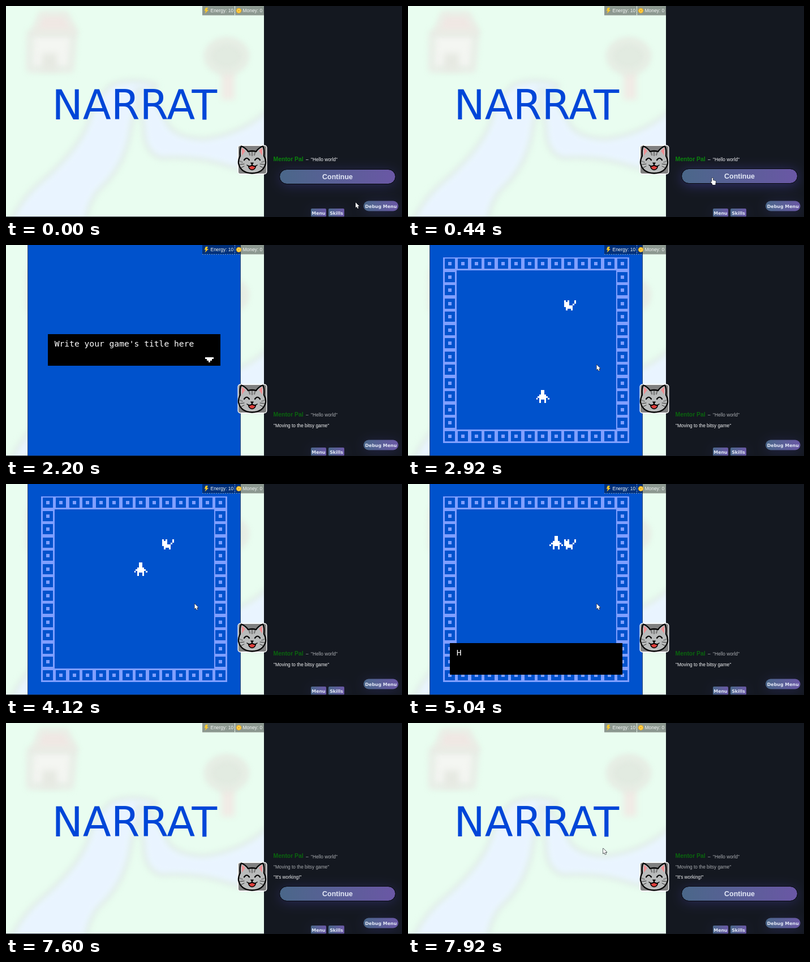
These frames come from a looping animation (700x374 px, 8000 ms). An HTML page with a canvas:

```html
<!DOCTYPE html>
<html lang="en">
<head>
<meta charset="utf-8">
<title>Narrat and bitsy</title>
<style>
  html, body { margin: 0; width: 100%; height: 100%; overflow: hidden; background: #141820; }
  canvas { display: block; }
</style>
</head>
<body>
<canvas id="stage" width="700" height="374"></canvas>
<script>
const W = 700, H = 374, LOOP = 8000, SPLIT = 456;
const ctx = document.getElementById('stage').getContext('2d');
const ARIAL = '"Liberation Sans", Arial, sans-serif';
const DEJAVU = '"DejaVu Sans", Verdana, sans-serif';

// Room geometry: 16 x 16 tiles of 8 x 8 pixels
const X0 = 38.5, Y0 = -2, TILE = 23.5, PX = TILE / 8;
const HERO = [0x18, 0x18, 0x18, 0x3c, 0x7e, 0xbd, 0x24, 0x24];
const CAT = [0, 0, 0x51, 0x71, 0x72, 0x7c, 0x3c, 0x24];
const BLOCK = [0xff, 0x81, 0x81, 0x99, 0x99, 0x81, 0x81, 0xff];

const GAME_ON = 1200, ROOM_ON = 2240, GAME_OFF = 7600;
const STEPS_UP = [2920, 3120, 3520, 3720, 3920, 4120, 4240, 4440];
const STEP_RIGHT = 4800;

// start, typing begins, typing ends, text
const PAGES = [
  [5040, 5080, 5360, 'Hello'],
  [5520, 5520, 5720, "I'm a cat"],
  [6400, 6400, 6800, '"bitsyTest":']
];

// time, x, y
const POINTER = [
  [0, 617.5, 348], [40, 617.5, 348], [440, 537, 304], [1380, 537, 304],
  [1760, 319, 221], [1920, 333, 215], [2399, 333, 215], [2400, 333, 212],
  [7600, 333, 212], [7920, 344.5, 222], [LOOP, 344.5, 222]
];

const clamp = v => Math.min(1, Math.max(0, v));
const ease = v => v * v * (3 - 2 * v);

function text(str, x, y, font, color, align = 'left') {
  ctx.font = font;
  ctx.fillStyle = color;
  ctx.textAlign = align;
  ctx.fillText(str, x, y);
}

function rect(x, y, w, h, color) {
  ctx.fillStyle = color;
  ctx.fillRect(x, y, w, h);
}

function poly(c, points, fill, stroke, width) {
  c.beginPath();
  points.forEach(([x, y]) => c.lineTo(x, y));
  c.closePath();
  if (fill) { c.fillStyle = fill; c.fill(); }
  if (stroke) { c.strokeStyle = stroke; c.lineWidth = width; c.stroke(); }
}

function line(path, color, width) {
  ctx.strokeStyle = color;
  ctx.lineWidth = width;
  ctx.stroke(new Path2D(path));
}

function makeScene() {
  const canvas = document.createElement('canvas');
  canvas.width = SPLIT;
  canvas.height = H;
  const c = canvas.getContext('2d');
  c.fillStyle = '#e9fdf0';
  c.fillRect(0, 0, SPLIT, H);
  c.filter = 'blur(5.5px)';
  c.lineJoin = 'round';

  const rivers = [
    'M190 142 Q225 130 262 142 Q222 165 216 225 Q205 285 160 325 Q140 350 136 390 L10 390 Q25 345 75 305 Q135 250 150 205 Q160 165 190 142Z',
    'M236 150 Q268 175 283 212 Q298 237 350 239 Q425 230 475 178 L475 292 Q420 290 380 276 Q330 262 275 266 Q246 258 247 212 Z'
  ];
  for (const d of rivers) {
    const p = new Path2D(d);
    c.strokeStyle = '#e1ede7';
    c.lineWidth = 13;
    c.stroke(p);
    c.fillStyle = '#e9f4ff';
    c.fill(p);
  }

  poly(c, [[43, 48], [120, 48], [114, 112], [42, 112]], '#f4f6f2', '#e7ece5', 11);
  poly(c, [[62, 14], [106, 14], [122, 46], [50, 46]], '#f0e8e4', '#e9ebe4', 7);
  c.fillStyle = '#e6e9e2';
  c.fillRect(64, 84, 26, 30);

  c.fillStyle = '#f0ebe5';
  c.fillRect(381, 112, 23, 54);
  c.beginPath();
  c.ellipse(390, 89, 34, 28, 0, 0, 7);
  c.fillStyle = '#e2ebe1';
  c.fill();
  c.strokeStyle = '#e7ebe3';
  c.lineWidth = 9;
  c.stroke();
  return canvas;
}
const scene = makeScene();

function sprite(rows, col, row, color) {
  ctx.fillStyle = color;
  const x = X0 + col * TILE, y = Y0 + row * TILE;
  const snap = Math.round;
  rows.forEach((bits, j) => {
    for (let i = 0; i < 8; i++) {
      if (!(bits >> (7 - i) & 1)) continue;
      const l = snap(x + i * PX), t = snap(y + j * PX);
      ctx.fillRect(l, t, snap(x + (i + 1) * PX) - l, snap(y + (j + 1) * PX) - t);
    }
  });
}

function dialog(y, str, arrow) {
  rect(74, y, 305, 56, '#000');
  text(str, 85.7, y + 22, '14.64px "DejaVu Sans Mono", monospace', '#fff');
  if (!arrow) return;
  for (let i = 0; i < 3; i++) {
    rect(352 + i * 3, y + 41 + i * 3, 15 - i * 6, 3, '#fff');
  }
}

function room(t) {
  for (let i = 1; i < 15; i++) {
    sprite(BLOCK, i, 1, '#809fff');
    sprite(BLOCK, i, 14, '#809fff');
    if (i > 1 && i < 14) {
      sprite(BLOCK, 1, i, '#809fff');
      sprite(BLOCK, 14, i, '#809fff');
    }
  }
  sprite(CAT, 10, 4, '#fff');
  const climbed = STEPS_UP.filter(s => t >= s).length;
  sprite(HERO, t < STEP_RIGHT ? 8 : 9, 12 - climbed, '#fff');

  const page = PAGES.filter(p => t >= p[0]).pop();
  if (page) {
    const [, from, to, str] = page;
    const k = clamp((t - from) / (to - from));
    dialog(282, str.slice(0, 1 + Math.floor(k * (str.length - 1))), k === 1);
  }
}

function game(t) {
  rect(38, 0, 377, H, '#2b4a70');
  rect(39, 0, 375, H, '#0052cc');
  if (t < ROOM_ON) dialog(158, "Write your game's title here", true);
  else room(t);
}

function hud() {
  rect(347, 0, 57, 16.5, 'rgba(0,0,0,.4)');
  rect(405, 0, 51, 16.5, 'rgba(0,0,0,.4)');
  ctx.lineCap = 'butt';
  ctx.setLineDash([2, 2]);
  line('M347 16.5H456M404.5 0V16', 'rgba(200,200,190,.6)', 1);
  ctx.setLineDash([]);
  poly(ctx, [[353, 3], [357, 3], [355, 7], [358, 7], [351.5, 13.5], [353.3, 8.6], [350.8, 8.6]], '#ffc928');
  ctx.beginPath();
  ctx.arc(411.5, 8.3, 4.6, 0, 7);
  ctx.fillStyle = '#f6b21b';
  ctx.fill();
  ctx.beginPath();
  ctx.arc(411.5, 8.3, 2.5, 0, 7);
  ctx.strokeStyle = '#ffdf6b';
  ctx.lineWidth = 1.2;
  ctx.stroke();
  const font = '8.4px ' + ARIAL;
  text('Energy: 10', 361.6, 10.5, font, '#f1f3f2');
  text('Money: 0', 418.6, 10.5, font, '#f1f3f2');
}

function portrait() {
  ctx.beginPath();
  ctx.roundRect(410.2, 247.2, 50.6, 50.6, 4);
  ctx.fillStyle = '#808080';
  ctx.fill();
  ctx.strokeStyle = '#fff';
  ctx.lineWidth = 1.4;
  ctx.stroke();

  ctx.lineJoin = ctx.lineCap = 'round';
  const head = new Path2D('M414 266 Q413 253 416 248.500 Q423 251 428 258 Q435 256 442 258 Q447 251 454 248.500 Q457 253 456 266 Q459.500 272 459 279 Q455 296 435 296.500 Q415 296 411 279 Q410.500 272 414 266Z');
  ctx.fillStyle = '#b9bbbb';
  ctx.fill(head);
  poly(ctx, [[417, 251], [423, 257], [417, 265]], '#ee8f93');
  poly(ctx, [[453, 251], [447, 257], [453, 265]], '#ee8f93');
  line('M435 258V265M429.500 259L431 264M440.500 259L439 264', '#777', 2.4);
  line('M413 275L418 277M457 275L452 277', '#858787', 2);
  ctx.strokeStyle = '#000';
  ctx.lineWidth = 2.3;
  ctx.stroke(head);
  line('M421 273Q425.500 266.500 430 273M440 273Q444.500 266.500 449 273', '#000', 2.2);
  line('M413 281L421 280M414.500 287L421 284M457 281L449 280M455.500 287L449 284', '#333', 1);
  const mouth = new Path2D('M428.500 283.500Q432 285 435 282.500Q438 285 441.500 283.500Q440.500 290 435 290.500Q429.500 290 428.500 283.500Z');
  ctx.fillStyle = '#df3f3c';
  ctx.fill(mouth);
  ctx.strokeStyle = '#000';
  ctx.lineWidth = 1.6;
  ctx.stroke(mouth);
  line('M426 282Q431 286 435 281.500Q439 286 444 282', '#000', 1.6);
  poly(ctx, [[432.5, 278], [437.5, 278], [435, 281]], '#000', '#000', 1);
}

function button(x, y, w, h, r, label, font, base, glow) {
  const fill = ctx.createLinearGradient(x, 0, x + w, 0);
  fill.addColorStop(0, '#4a6789');
  fill.addColorStop(1, '#6a57a5');
  ctx.save();
  ctx.shadowColor = `rgba(78,72,190,${glow})`;
  ctx.shadowBlur = 22;
  ctx.shadowOffsetY = 3;
  ctx.beginPath();
  ctx.roundRect(x, y, w, h, r);
  ctx.fillStyle = fill;
  ctx.fill();
  ctx.restore();
  text(label, x + w / 2, base, font, '#e3e8f6', 'center');
}

function continueButton(hover) {
  const y = hover ? 289 : 290;
  button(484, y, 204, 25, 12.5, 'Continue', 'bold 12.45px ' + ARIAL, y + 16.8, hover ? 0.5 : 0.35);
  ctx.beginPath();
  ctx.roundRect(483.5, y - 0.5, 205, 26, 13);
  ctx.strokeStyle = '#07090e';
  ctx.lineWidth = 1;
  ctx.stroke();
}

function log(lines, bottom, gap) {
  const font = '8.3px ' + ARIAL;
  lines.forEach((str, i) => {
    const last = i === lines.length - 1;
    const color = last ? '#f2f3f4' : '#a9acb0';
    const y = bottom - (lines.length - 1 - i) * gap;
    if (i > 0) return text(str, 473, y, font, color);
    text('Mentor Pal', 472.6, y - 0.3, 'bold 10.4px ' + ARIAL, last ? '#0a850c' : '#0a650e');
    text('–', 530, y, font, color);
    text(str, 539, y, font, color);
  });
}

function panel(t, inGame, hover) {
  rect(SPLIT, 0, W - SPLIT, H, '#141820');
  const lines = ['"Hello world"'];
  if (t >= 560) lines.push('"Moving to the bitsy game"');
  if (t >= GAME_OFF) lines.push('"It\'s working!"');
  log(lines, inGame ? 323 : t < 560 ? 275 : 276, inGame ? 19 : 18.2);
  if (!inGame) continueButton(hover);
  const small = 'bold 7.9px ' + DEJAVU;
  button(632, 345.5, 61.5, 18, 9, 'Debug Menu', small, 357.7, 0.25);
  button(539, 359, 27, 15, 2, 'Menu', small, 369.7, 0.2);
  button(570, 359, 28, 15, 2, 'Skills', small, 369.7, 0.2);
}

function pointerAt(t) {
  const i = POINTER.findIndex(p => p[0] > t);
  const [t0, x0, y0] = POINTER[i - 1], [t1, x1, y1] = POINTER[i];
  const k = ease((t - t0) / (t1 - t0));
  return [x0 + (x1 - x0) * k, y0 + (y1 - y0) * k];
}

function pointer(t, x, y, hand) {
  if ((t >= 2200 && t < 2400) || (t >= 5520 && t < 7640)) return;
  if ((t >= 480 && t < 640) || (t >= 960 && t < GAME_ON)) {
    ctx.beginPath();
    ctx.arc(x + 0.8, y + 0.7, 7.2, 0, 7);
    ctx.fillStyle = 'rgba(190,185,45,.82)';
    ctx.fill();
  }
  ctx.save();
  ctx.translate(x, y);
  ctx.lineJoin = 'round';
  const shape = new Path2D(hand
    ? 'M.2 1.200Q1.200 0 2.200 1.200V5L6 5.800Q7.400 6.200 7.200 8L6.400 11V13H1.200V11.400L-2 8Q-1.800 6.600 .2 7.600Z'
    : 'M.5 .3V9.400L2.500 7.600L4 11L5.600 10.300L4.200 7.100H7Z');
  ctx.strokeStyle = '#10131a';
  ctx.lineWidth = 1.2;
  ctx.stroke(shape);
  ctx.fillStyle = '#fff';
  ctx.fill(shape);
  ctx.restore();
}

function draw(t) {
  const inGame = t >= GAME_ON && t < GAME_OFF;
  const [x, y] = pointerAt(t);
  const hand = t < 1400 && y < 316;
  ctx.drawImage(scene, 0, 0);
  if (inGame) game(t);
  else text('NARRAT', 81.2, 200.5, '73px ' + DEJAVU, '#0046d8');
  hud();
  panel(t, inGame, hand);
  rect(0, 373, W, 1, 'rgba(20,24,32,.75)');
  portrait();
  pointer(t, x, y, hand);
}

const start = performance.now();
function tick() {
  draw((performance.now() - start) % LOOP);
  requestAnimationFrame(tick);
}
tick();
</script>
</body>
</html>
```
